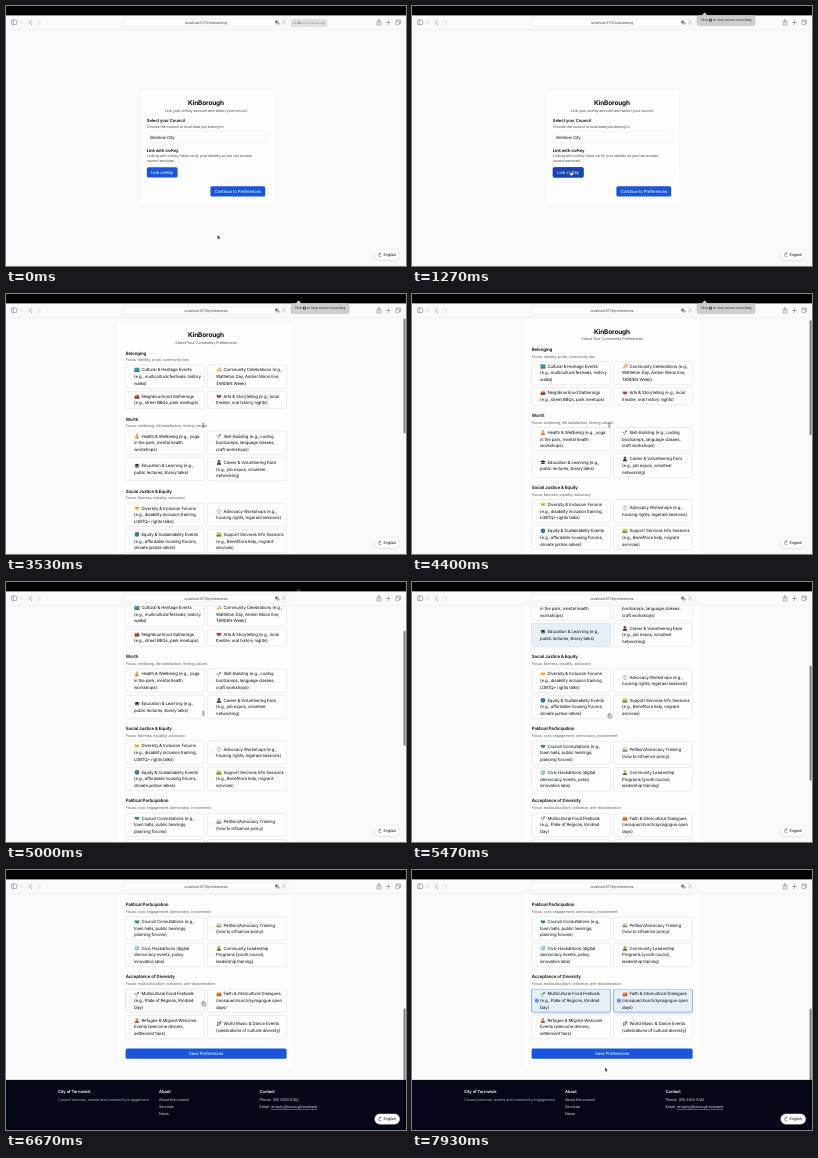
An HTML page that plays this animation: 400x260 px, repeating every 8000 ms.

```html
<!DOCTYPE html>
<html lang="en">
<head>
<meta charset="utf-8">
<title>Community preferences</title>
<style>
@property --s { syntax: "<number>"; inherits: true; initial-value: 0; }
html, body { margin: 0; width: 100%; height: 100%; overflow: hidden; background: #fafafa; }
svg { display: block; width: 100vw; height: 100vh; }
#stage { font-family: Inter, Arial, sans-serif; text-rendering: geometricPrecision; animation: scroll 8s infinite; }
text { white-space: pre; letter-spacing: -.025em; }
.a { animation: 8s linear infinite both; }
.st { animation-timing-function: step-end; }
#page2 { transform: translateY(calc(var(--s) * -1px)); }
#thumb { transform: translateY(calc(var(--s) * .486px)); }

@keyframes scroll {
  0%, 53% { --s: 0; animation-timing-function: ease-in; }
  55% { --s: 3.5; animation-timing-function: cubic-bezier(.33,.19,.67,.51); }
  62.5% { --s: 50; animation-timing-function: cubic-bezier(.33,.25,.67,.62); }
  68.38% { --s: 122; animation-timing-function: cubic-bezier(.33,.3,.67,.8); }
  74.13% { --s: 212; animation-timing-function: cubic-bezier(.33,.73,.67,.87); }
  78.75% { --s: 232; animation-timing-function: ease-out; }
  82.5%, 100% { --s: 234.5; }
}
@keyframes first { 0% { visibility: visible; } 24.1%, 100% { visibility: hidden; } }
@keyframes second { 0% { visibility: hidden; } 24.1%, 100% { visibility: visible; } }
@keyframes bar { 0%, 40% { opacity: 0; } 42%, 100% { opacity: 1; } }
@keyframes pill {
  0%, .8% { transform: translate(285px,13.2px) scale(.62,.74); opacity: .6; animation-timing-function: ease-out; }
  5.5%, 59.5% { transform: translate(285px,9.4px); opacity: 1; }
  62.3%, 100% { transform: translate(285px,9.4px); opacity: 0; }
}
@keyframes tip { 0%, 3% { opacity: 0; } 5.5%, 59.5% { opacity: 1; } 63.5%, 100% { opacity: 0; } }

@keyframes linkHover { 0%, 5.6% { opacity: 0; } 7.4%, 18.3% { opacity: 1; } 20%, 100% { opacity: 0; } }
@keyframes goHover { 0%, 19.2% { opacity: 0; } 20.8%, 100% { opacity: 1; } }
@keyframes career { 0%, 24.2% { opacity: 0; } 26%, 36.5% { opacity: 1; } 38.3%, 100% { opacity: 0; } }
@keyframes learn { 0%, 64% { opacity: 0; } 65.8%, 69.5% { opacity: 1; } 71.3%, 100% { opacity: 0; } }
@keyframes food { 0%, 83% { opacity: 0; } 84.8%, 100% { opacity: 1; } }
@keyframes faith { 0%, 88.8% { opacity: 0; } 90.6%, 100% { opacity: 1; } }
@keyframes foodOn { 0%, 86.6% { opacity: 0; } 88%, 100% { opacity: 1; } }
@keyframes faithOn { 0%, 91.6% { opacity: 0; } 93%, 100% { opacity: 1; } }

@keyframes move {
  0%, .9% { transform: translate(211.5px,229px); animation-timing-function: ease-in-out; }
  6.8%, 18% { transform: translate(159px,165px); animation-timing-function: ease-in-out; }
  20.2%, 24.2% { transform: translate(214px,184px); animation-timing-function: ease-in-out; }
  28%, 35% { transform: translate(218.3px,184.8px); animation-timing-function: ease-in-out; }
  44%, 83.5% { transform: translate(197.3px,131.3px); animation-timing-function: ease-in-out; }
  85.8%, 87.8% { transform: translate(180px,131px); animation-timing-function: ease-in-out; }
  90.6%, 94.8% { transform: translate(226px,131px); animation-timing-function: ease-in-out; }
  99%, 100% { transform: translate(193px,197.4px); }
}
@keyframes arrow {
  0% { visibility: visible; } 5.6% { visibility: hidden; }
  18.3% { visibility: visible; } 19.3% { visibility: hidden; }
  96.6%, 100% { visibility: visible; }
}
@keyframes hand {
  0% { visibility: hidden; } 5.6% { visibility: visible; }
  18.3% { visibility: hidden; } 19.3% { visibility: visible; }
  43% { visibility: hidden; } 64% { visibility: visible; }
  96.6%, 100% { visibility: hidden; }
}
@keyframes beam { 0% { visibility: hidden; } 43% { visibility: visible; } 64%, 100% { visibility: hidden; } }
</style>
</head>
<body>
<svg id="stage" viewBox="0 0 400 260" preserveAspectRatio="none">
  <rect width="400" height="260" fill="#fafafa"/>
  <g id="page1" class="a st" style="animation-name:first"></g>
  <g class="a st" style="animation-name:second"><g id="page2"></g></g>
  <g class="a" style="animation-name:bar">
    <rect id="thumb" x="397.6" y="24.5" width="2" height="115" rx="1" fill="#000" fill-opacity=".5"/>
  </g>
  <g id="lang"></g>
  <g id="chrome"></g>
  <g id="cursor" class="a" style="animation-name:move">
    <path class="a st" style="animation-name:arrow" d="M0 0V4L.95 3.15 1.6 4.6 2.3 4.3 1.7 2.9H2.9Z" fill="#000" stroke="#fff" stroke-width=".35"/>
    <path class="a st" style="animation-name:hand" d="M-.5.3Q0-.3.5.3V1.7L2 2Q2.5 2.2 2.4 3L2 4.7H-.4L-1.7 2.9Q-1.5 2.2-.5 2.8Z" fill="#fff" stroke="#111" stroke-width=".5" stroke-linejoin="round"/>
    <path class="a st" style="animation-name:beam" d="M-.9-2Q0-2 0-1.5V1.5Q0 2-.9 2M.9-2Q0-2 0-1.5M0 1.5Q0 2 .9 2" fill="none" stroke="#111" stroke-width=".55"/>
  </g>
</svg>
<script>
const NS = 'http://www.w3.org/2000/svg';
const $ = id => document.getElementById(id);

function add(parent, tag, attrs) {
  const node = document.createElementNS(NS, tag);
  for (const k in attrs) node.setAttribute(k, attrs[k]);
  parent.appendChild(node);
  return node;
}
const BLUE = '#1a56db', INK = '#0c0e11', SOFT = '#4b4f55', PANEL = '#fdfdfd';
const SMALL = 3.77, BASE = 4.3;

// y is the middle of the text line
function text(parent, x, y, str, size = SMALL, fill = SOFT, more = {}) {
  const node = add(parent, 'text', { x, y: y + size * .35, 'font-size': size, fill, ...more });
  node.textContent = str;
  return node;
}
const box = (parent, x, y, width, height, rx, fill, more = {}) =>
  add(parent, 'rect', { x, y, width, height, rx, fill, ...more });
const line = (parent, d, stroke = '#666', w = .5) =>
  add(parent, 'path', { d, stroke, 'stroke-width': w, fill: 'none', 'stroke-linecap': 'round', 'stroke-linejoin': 'round' });
const timed = name => ({ class: 'a', style: 'animation-name:' + name });
const bold = { 'font-weight': 700 }, semi = { 'font-weight': 600 }, mid = { 'text-anchor': 'middle' };

function button(parent, x, y, w, h, label, hover) {
  box(parent, x, y, w, h, 1.6, BLUE);
  if (hover) box(parent, x, y, w, h, 1.6, '#1743b4', timed(hover));
  text(parent, x + w / 2, y + h / 2, label, BASE, '#fff', mid);
}

// Small pictograms in a 6 by 6 box: shape name, first colour, second colour
const ICONS = {
  sq: (g, a, b) => { box(g, .4, .8, 5.2, 4.5, .6, a); add(g, 'path', { d: 'M.4 5.3V3.9L2.2 2.6 3.5 3.9 4.5 3.1 5.6 4.2V5.3Z', fill: b }); },
  rd: (g, a, b) => { add(g, 'circle', { cx: 3, cy: 3, r: 2.5, fill: a }); add(g, 'path', { d: 'M1.4 1.6 3 1 3.4 2.6 2.4 3.8 1.4 2.8ZM3.6 3.4 5 3 4.2 4.9Z', fill: b }); },
  pp: (g, a, b) => { add(g, 'path', { d: 'M.6 5.6Q.8 2.9 3 2.9T5.4 5.6Z', fill: b }); add(g, 'circle', { cx: 3, cy: 1.9, r: 1.4, fill: a }); },
  cn: (g, a, b) => { add(g, 'path', { d: 'M.5 5.5 2 1.8 4.2 4Z', fill: a }); line(g, 'M3.2 1.8 3.6.8M4.2 2.4 5.2 1.6M4.6 3.6 5.5 3.8', b, .8); },
  hs: (g, a, b) => { add(g, 'path', { d: 'M.4 5.4V2.8L2 1.2 3 2.2 4 .8 5.6 2.6V5.4Z', fill: a }); add(g, 'path', { d: 'M1.3 5.4V3.6H2.5V5.4ZM3.6 5.4V3.2H4.8V5.4Z', fill: b }); },
  hd: (g, a, b) => { add(g, 'path', { d: 'M.2 2 2 1.4 3 2 4 1.4 5.8 2 5 4 3.2 5 1 4Z', fill: a }); line(g, 'M2 3 3 2.3 4.3 3.6', b, .5); },
  sc: (g, a, b) => { line(g, 'M3 .8V5M1.8 5.3H4.2M.9 1.6H5.1', a, .5); add(g, 'path', { d: 'M0 3.2H2L1 4.2ZM4 3.2H6L5 4.2Z', fill: b }); },
  lf: (g, a, b) => { line(g, 'M2.6 5.5Q2.4 3.6 4 2.4', b, .6); add(g, 'path', { d: 'M2.8 3.4Q2.8.8 5.6.8 5.4 3.4 2.8 3.4ZM2.2 3.8Q.4 3.8.4 2 2.2 2 2.2 3.8Z', fill: a }); },
  cp: (g, a, b) => { add(g, 'path', { d: 'M0 2.3 3 1 6 2.3 3 3.7ZM1.2 3.3 3 4.2 4.8 3.3V4.6Q3 5.6 1.2 4.6Z', fill: a }); line(g, 'M5.3 2.6V4.6', b, .5); },
  nt: (g, a, b) => { line(g, 'M1.6 4.6V1.8L3.4 1.2V4M4.6 3.2V.6L5.5 1.2', a, .6); add(g, 'path', { d: 'M.5 4.7H1.8V5.5H.5ZM2.4 4H3.6V4.9H2.4Z', fill: b }); }
};

// Each card: icon | lines of text
const SECTIONS = [
  [59, 'Belonging', 'Focus: identity, pride, community ties', [
    [71, 23.2,
      'sq #3f8fc4 #4f8a3c|Cultural & Heritage Events|(e.g., multicultural festivals, history|walks)',
      'cn #e9b534 #d6425c|Community Celebrations (e.g.,|Wattleton Day, Amber Moon Eve,|TARDEN Week)'],
    [97.2, 17.2,
      'hs #c0603a #5d3b2a|Neighbourhood Gatherings|(e.g., street BBQs, park meetups)',
      'hd #c8433b #3569a8|Arts & Storytelling (e.g., local|theatre, oral history nights)']]],
  [125, 'Worth', 'Focus: wellbeing, life satisfaction, feeling valued', [
    [137, 23.4,
      'pp #e2b063 #d98a3d|Health & Wellbeing (e.g., yoga|in the park, mental health|workshops)',
      'lf #4fa35a #3d8748|Skill-Building (e.g., coding|bootcamps, language classes,|craft workshops)'],
    [163.4, 23.4,
      'cp #26292e #c99b35|Education & Learning (e.g.,|public lectures, library talks)',
      'pp #8a4a35 #3c2f38|Career & Volunteering Fairs|(e.g., job expos, volunteer|networking)', 'learn', 'career']]],
  [197, 'Social Justice & Equity', 'Focus: fairness, equality, advocacy', [
    [209, 23.4,
      'hd #efb73e #b77f22|Diversity & Inclusion Forums|(e.g., disability inclusion training,|LGBTQ+ rights talks)',
      'sc #8d9096 #b9a878|Advocacy Workshops (e.g.,|housing rights, legal aid sessions)'],
    [235.4, 23.4,
      'rd #2d6fb0 #4c9a4d|Equity & Sustainability Events|(e.g., affordable housing forums,|climate justice rallies)',
      'sq #e5c95a #5d8f4d|Support Services Info Sessions|(e.g., Benefitora help, migrant|services)']]],
  [269, 'Political Participation', 'Focus: civic engagement, democracy, involvement', [
    [281.3, 23.4,
      'hd #3f8f9c #2b5d75|Council Consultations (e.g.,|town halls, public hearings,|planning forums)',
      'sq #d7d9cf #8a9a62|Petition/Advocacy Training|(how to influence policy)'],
    [307.7, 23.4,
      'rd #7fb7d8 #d6ebf5|Civic Hackathons (digital|democracy events, policy|innovation labs)',
      'pp #e0a83c #4c7a3c|Community Leadership|Programs (youth council,|leadership training)']]],
  [341, 'Acceptance of Diversity', 'Focus: multiculturalism, tolerance, anti-discrimination', [
    [353.4, 23.4,
      'lf #4b8f45 #93652f|Multicultural Food Festivals|(e.g., Plate of Regions, Kindred|Day)',
      'hs #d8883a #b53f35|Faith & Intercultural Dialogues|(mosque/church/synagogue open|days)', 'food', 'faith'],
    [379.8, 23.4,
      'pp #d99b55 #a8473d|Refugee & Migrant Welcome|Events (welcome dinners,|settlement fairs)',
      'nt #2f3238 #55585e|World Music & Dance Events|(celebrations of cultural diversity)']]]
];

function card(parent, x, y, h, spec, state) {
  const [icon, ...lines] = spec.split('|');
  const [kind, a, b] = icon.split(' ');
  const cy = y + h / 2, w = 79;
  box(parent, x, y, w, h, 1.7, PANEL, { stroke: '#d9dbde', 'stroke-width': .45 });
  if (state) box(parent, x, y, w, h, 1.7, '#e5eff9', { stroke: '#cbd8e6', 'stroke-width': .45, ...timed(state) });
  box(parent, x + 3.7, cy - 1.6, 3.2, 3.2, .8, '#fff', { stroke: '#d9dbde', 'stroke-width': .3 });
  if (state === 'food' || state === 'faith') {
    const on = add(parent, 'g', timed(state + 'On'));
    box(on, x, y, w, h, 1.7, 'none', { stroke: '#5d90ea', 'stroke-width': .6 });
    box(on, x + 3.6, cy - 1.7, 3.4, 3.4, .8, '#2563eb');
    line(on, `M${x + 4.5} ${cy + .1}l.6 .7 1.1-1.5`, '#fff', .5);
  }
  const top = cy - (lines.length - 1) * 3.28 - .1;
  ICONS[kind](add(parent, 'g', { transform: `translate(${x + 8.5} ${top - 2.9}) scale(.95)` }), a, b);
  lines.forEach((s, i) => text(parent, x + (i ? 8.4 : 15.8), top + i * 6.56, s, BASE, INK));
}

function buildOnboarding(p) {
  box(p, 134, 84, 133.5, 115, 2.5, PANEL, { stroke: '#f4f4f5', 'stroke-width': .4 });
  text(p, 200, 97.2, 'KinBorough', 6.5, INK, { ...bold, ...mid });
  text(p, 200, 105, 'Link your civKey account and select your council', SMALL, SOFT, mid);
  text(p, 140.8, 115, 'Select your Council', 4.25, INK, semi);
  text(p, 140.8, 121, 'Choose the council or local area you belong to.', 3.7);
  box(p, 141, 125.6, 119, 11.2, 1.5, PANEL, { stroke: '#e3e5e8', 'stroke-width': .4 });
  text(p, 144.2, 131.3, 'Brenlow City', BASE, INK);
  text(p, 140.8, 144.2, 'Link with civKey', 4.25, INK, semi);
  text(p, 140.8, 150, 'Linking with civKey helps verify your identity so you can access', 3.7);
  text(p, 140.8, 155.2, 'council services.', 3.7);
  button(p, 140.8, 161.2, 30.8, 10.4, 'Link civKey', 'linkHover');
  button(p, 204.4, 180.2, 54.8, 10.4, 'Continue to Preferences', 'goHover');
}

function buildPreferences(p) {
  box(p, 111, 28.5, 177.5, 403, 2.5, PANEL, { stroke: '#f4f4f5', 'stroke-width': .4 });
  text(p, 200, 41, 'KinBorough', 6.5, INK, { ...bold, ...mid });
  text(p, 200, 48.5, 'Select Your Community Preferences', SMALL, SOFT, mid);
  for (const [y, title, focus, rows] of SECTIONS) {
    text(p, 119.7, y, title, 4.45, INK, semi);
    text(p, 119.7, y + 7, focus, SMALL, '#60646b');
    for (const [top, h, left, right, leftState, rightState] of rows) {
      card(p, 119.6, top, h, left, leftState);
      card(p, 201.6, top, h, right, rightState);
    }
  }
  button(p, 119.6, 412.9, 161, 10.4, 'Save Preferences');

  box(p, 0, 444.4, 400, 60, 0, '#030718');
  const light = '#d3d7dd';
  const column = (x, title, items, fill = light) => {
    text(p, x, 456.3, title, 4.15, '#fff', semi);
    items.forEach((s, i) => text(p, x, 464.2 + i * 7.2, s, SMALL, fill));
  };
  column(52, 'City of Tarrowick', ['Council services, events and community engagement.'], '#aab0ba');
  column(153, 'About', ['About the council', 'Services', 'News']);
  column(253.6, 'Contact', ['Phone: (05) 5550 0142', 'Email: ']);
  text(p, 265.2, 471.4, 'enquiry@borough.example', SMALL, light, { 'text-decoration': 'underline' });
}

function buildChrome(c) {
  box(c, 0, 0, 400, 24, 0, '#fafafa');
  box(c, 0, 0, 400, 9.4, 0, '#000');
  line(c, 'M0 23.4H400', '#e9e9ea');
  box(c, 5.4, 14, 5.4, 4.6, 1, 'none', { stroke: '#666', 'stroke-width': .5 });
  line(c, 'M7.3 14V18.6');
  line(c, 'M14.4 16 15.3 16.9 16.2 16', '#888');
  line(c, 'M25.4 14.3 23.6 16.4 25.4 18.5');
  line(c, 'M32.6 14.3 34.4 16.4 32.6 18.5', '#c4c4c6');
  box(c, 119, 12.9, 163, 7.4, 1.8, '#fdfdfd', { stroke: '#e8e8ea', 'stroke-width': .5 });
  const url = (path, name) =>
    text(c, 200, 16.6, 'localhost:5173/' + path, 3.55, '#444', { ...mid, class: 'a st', style: 'animation-name:' + name });
  url('onboarding', 'first');
  url('preferences', 'second');
  box(c, 269.2, 14.6, 2.6, 2.6, .5, '#777');
  box(c, 270.8, 16, 2.6, 2.6, .5, '#aaa');
  line(c, 'M278.6 15.4A1.6 1.6 0 1 0 279.2 16.8M278.8 14.4V15.6H277.6', '#999', .4);
  line(c, 'M372 15.6H371V19H375V15.6H374M373 17.4V13.6M372 14.5 373 13.5 374 14.5');
  line(c, 'M380.3 16.4H384.5M382.4 14.3V18.5');
  line(c, 'M390.4 15.2V14H394.4V17.6H393.4');
  box(c, 389.8, 15.2, 3.5, 3.5, .5, '#fafafa', { stroke: '#666', 'stroke-width': .45 });

  add(c, 'path', { d: 'M289.4 10 292.6 6.2 295.8 10Z', fill: '#cfcfd1', ...timed('tip') });
  const pill = add(c, 'g', timed('pill'));
  box(pill, -.6, .4, 59.2, 10.6, 3, '#000', { 'fill-opacity': .1 });
  box(pill, 0, 0, 58, 10, 2.5, '#cfcfd1', { stroke: '#bcbcbe', 'stroke-width': .3 });
  text(pill, 3.4, 4.7, 'Click', 3.5, '#333');
  add(pill, 'circle', { cx: 13.4, cy: 4.7, r: 1.7, fill: '#333' });
  box(pill, 12.8, 4.1, 1.2, 1.2, .2, '#eee');
  text(pill, 16, 4.7, 'to stop screen recording', 3.5, '#333');
}

function buildLanguage(g) {
  box(g, 368, 244.2, 26.4, 11, 5.5, '#000', { 'fill-opacity': .08 });
  box(g, 368.7, 243.9, 25, 10.3, 5.1, '#fff', { stroke: '#e2e2e4', 'stroke-width': .4 });
  line(g, 'M374.6 247.4A1.6 1.6 0 0 0 372.6 249.2Q372.8 251 374.8 250.8M373.9 246.6 374.8 247.4 374 248.3', '#333');
  text(g, 377.6, 249.1, 'English', 3.8, INK);
}

buildOnboarding($('page1'));
buildPreferences($('page2'));
buildChrome($('chrome'));
buildLanguage($('lang'));
</script>
</body>
</html>
```
